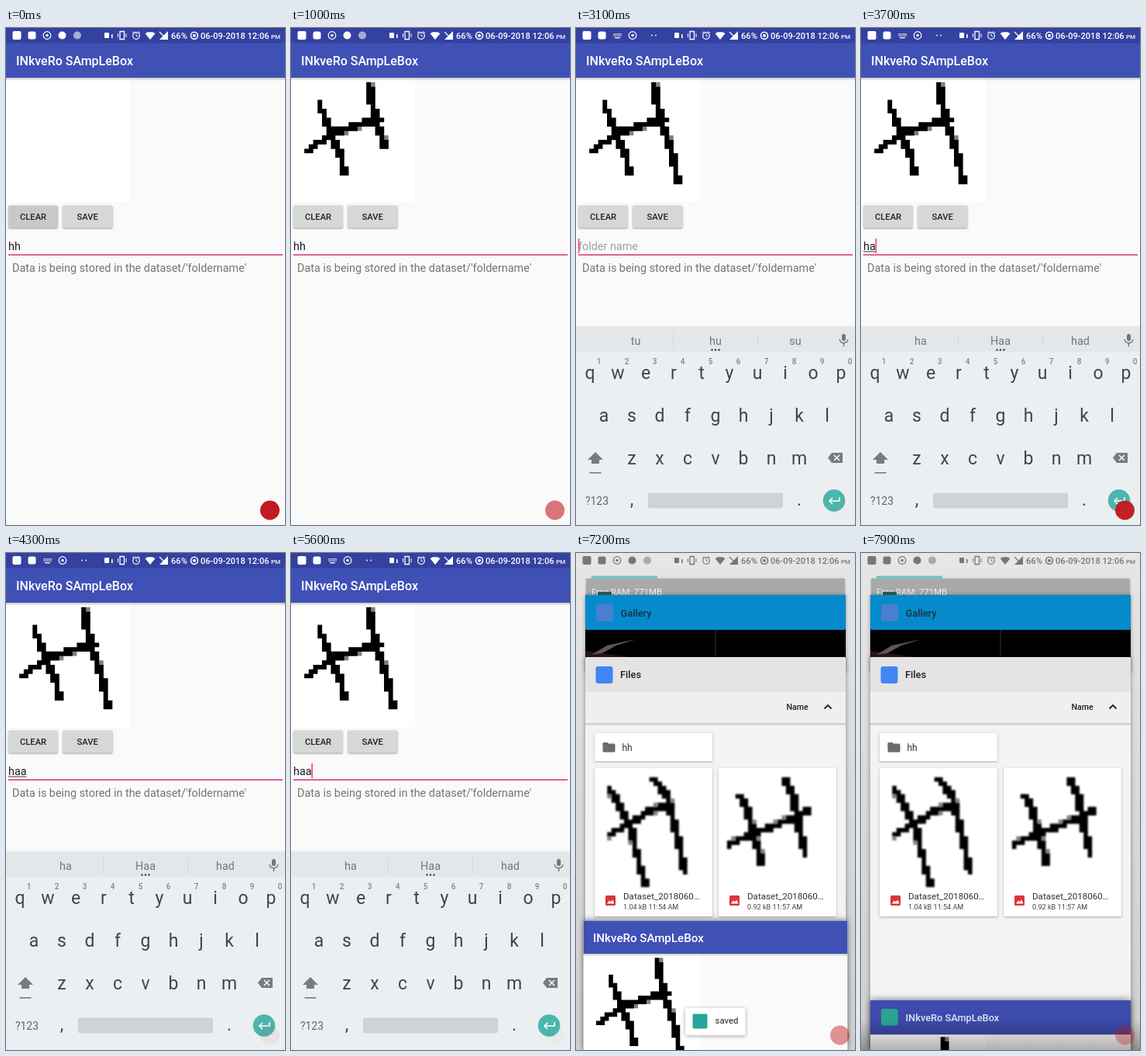
Animation, 360 px wide and 640 px high, one loop 8000 ms. Source, as an HTML page with a canvas:

```html
<!DOCTYPE html>
<html lang="en">
<head>
<meta charset="utf-8">
<style>
html, body { margin: 0; width: 100%; height: 100%; overflow: hidden; background: #fafafa; }
canvas { display: block; width: 360px; height: 640px; }
</style>
</head>
<body>
<canvas id="stage" width="360" height="640"></canvas>
<script>
const ctx = document.getElementById('stage').getContext('2d');
const LOOP = 8000, STEP = 100;
const APP_NAME = 'INkveRo SAmpLeBox';
const clamp = v => Math.max(0, Math.min(1, v));
const span = (t, from, to) => clamp((t - from) / (to - from));
const easeOut = u => 1 - (1 - u) ** 3;

// ---------- drawing helpers ----------
function rect(x, y, w, h, color, r = 0) {
  ctx.fillStyle = color;
  ctx.beginPath();
  ctx.roundRect(x, y, w, h, r);
  ctx.fill();
}
function disc(x, y, r, color) {
  ctx.fillStyle = color;
  ctx.beginPath();
  ctx.arc(x, y, r, 0, 7);
  ctx.fill();
}
function line(points, color, width = 1, close = false) {
  ctx.strokeStyle = color;
  ctx.lineWidth = width;
  ctx.beginPath();
  points.forEach(p => ctx.lineTo(...p));
  if (close) ctx.closePath();
  ctx.stroke();
}
function poly(points, color) {
  ctx.fillStyle = color;
  ctx.beginPath();
  points.forEach(p => ctx.lineTo(...p));
  ctx.fill();
}
function ring(x, y, r, color, width = 1.2) {
  ctx.strokeStyle = color;
  ctx.lineWidth = width;
  ctx.beginPath();
  ctx.arc(x, y, r, 0, 7);
  ctx.stroke();
}
function text(str, x, y, size, color, weight = 400, align = 'left') {
  ctx.font = `${weight} ${size}px Roboto, sans-serif`;
  ctx.fillStyle = color;
  ctx.textAlign = align;
  ctx.fillText(str, x, y);
}
function fade(x, y, w, h, from, to) {
  const g = ctx.createLinearGradient(0, y, 0, y + h);
  g.addColorStop(0, from);
  g.addColorStop(1, to);
  rect(x, y, w, h, g);
}
function shadowed(blur, dy, alpha, draw) {
  ctx.save();
  ctx.shadowColor = `rgba(0,0,0,${alpha})`;
  ctx.shadowBlur = blur;
  ctx.shadowOffsetY = dy;
  draw();
  ctx.restore();
}
function layer(alpha, dy, draw) {
  ctx.save();
  ctx.globalAlpha *= alpha;
  ctx.translate(0, dy);
  draw();
  ctx.restore();
}

// ---------- pixelated handwriting ----------
const GRID = 28;
const strokes = [
  { at: [200, 450], pts: [[36, 97], [45, 118], [53, 138], [62, 160], [69, 184]] },
  { at: [500, 750], pts: [[22, 157], [50, 138], [80, 127], [114, 117]] },
  { at: [800, 1120], pts: [[101, 74], [105, 100], [112, 124], [124, 164], [131, 196]] }
];
function partial(pts, share) {
  const lens = pts.slice(1).map((p, i) => Math.hypot(p[0] - pts[i][0], p[1] - pts[i][1]));
  let left = share * lens.reduce((a, b) => a + b);
  const out = [pts[0]];
  for (let i = 0; i < lens.length && left > 0; i++) {
    const k = Math.min(1, left / lens[i]);
    out.push([0, 1].map(j => pts[i][j] + (pts[i + 1][j] - pts[i][j]) * k));
    left -= lens[i];
  }
  return out;
}
function distance(x, y, a, b) {
  const dx = b[0] - a[0], dy = b[1] - a[1];
  const k = clamp(((x - a[0]) * dx + (y - a[1]) * dy) / (dx * dx + dy * dy || 1));
  return Math.hypot(x - a[0] - dx * k, y - a[1] - dy * k);
}
function pixelInk(lines, left, top, cell) {
  const solid = new Path2D(), edge = new Path2D();
  for (let row = 0; row < GRID; row++) for (let col = 0; col < GRID; col++) {
    const x = left + col * cell, y = top + row * cell;
    let d = 99;
    for (const pts of lines) for (let i = 1; i < pts.length; i++)
      d = Math.min(d, distance(x + cell / 2, y + cell / 2, pts[i - 1], pts[i]));
    const noise = Math.abs(Math.sin(row * 12.99 + col * 78.23) * 43758.5) % 1;
    if (d < 4.5) solid.rect(x, y, cell + 0.2, cell + 0.2);
    else if (d < 5.8 && noise > 0.75) edge.rect(x, y, cell, cell);
  }
  ctx.fillStyle = 'rgba(0,0,0,.5)';
  ctx.fill(edge);
  ctx.fillStyle = '#000';
  ctx.fill(solid);
}
function handwriting(t) {
  const drawn = strokes.filter(s => t > s.at[0]).map(s => partial(s.pts, span(t, ...s.at)));
  pixelInk(drawn, 0, 64, 160 / GRID);
}

// ---------- status bar ----------
function statusBar(t, light) {
  const c = light ? '#777' : '#fff';
  rect(0, 0, 360, light ? 19 : 19.5, light ? '#e6e6e6' : '#3441a0');
  rect(8.5, 4, 11, 11, c, 2);
  rect(28.5, 4.5, 10, 10, c, 2.5);
  const typing = t >= 2300 && t < 6600;
  const slide = t >= 6600 ? 1 - span(t, 6600, 6700) : 0;
  const ringX = typing ? 73 : 53;
  ring(ringX, 9.5, 4.8, c);
  disc(ringX, 9.5, 1.8, c);
  if (typing) {
    for (let i = 0; i < 10; i++) rect(48.5 + i % 5 * 2.2, 7 + (i / 5 | 0) * 2.4, 1.4, 1.4, c);
    rect(50, 12, 7, 1.3, c);
    [98, 103].forEach(x => disc(x, 9.5, 0.9, c));
  } else {
    disc(72.5 + slide * 8, 9.5, 5, c);
    disc(92 + slide * 13, 9.5, 5, light ? '#aaa' : '#a3acd2');
  }
  rect(127, 6, 6, 7, c, 1);
  rect(136, 8, 1.6, 5, c);
  line([[147, 4.5], [152.5, 4.5], [152.5, 14.5], [147, 14.5]], c, 1.3, true);
  [[144.5, 7, 12], [155, 7, 12]].forEach(([x, a, b]) => line([[x, a], [x, b]], c));
  ring(168, 10, 4.3, c);
  line([[168, 7.5], [168, 10], [170, 11]], c);
  line([[163, 6.5], [165.5, 4.5]], c);
  line([[170.5, 4.5], [173, 6.5]], c);
  poly([[179.5, 7], [183, 5.3], [189, 5.3], [192.5, 7], [186, 15]], c);
  poly([[198, 15], [209, 4], [209, 15]], c);
  line([[198, 5], [207, 14]], c, 1.2);
  text('66%', 213, 13.7, 11.2, c, 500);
  ring(243, 9.7, 4.5, c, 1.6);
  disc(243, 9.7, 2, c);
  text('06-09-2018 12:06', 251, 13.7, 11.1, c, 500);
  text('PM', 342, 13.7, 8, c, 500);
}

// ---------- app screen ----------
const entries = [[0, 'hh'], [2700, 'h'], [2900, ''], [3400, 'h'], [3600, 'ha'], [3800, 'haa']];
const cursorResets = [2300, 3000, 3400, 3600, 3800, 5600];
const lastBefore = (list, t, key = v => v) => list.filter(v => key(v) <= t).pop();

function button(label, x, w, pressed) {
  shadowed(2, 1, 0.35, () => rect(x, 228.6, w, 29, pressed ? '#c9c9c9' : '#d6d7d7', 2));
  text(label, x + w / 2, 247.2, 11.2, '#222', 500, 'center');
}
function appScreen(t) {
  rect(0, 19, 360, 621, '#fafafa');
  rect(0, 64, 160, 160, '#fff');
  handwriting(t);
  rect(0, 19, 360, 45, '#3f51b5');
  fade(0, 64, 360, 4, 'rgba(0,0,0,.22)', 'rgba(0,0,0,0)');
  text(APP_NAME, 13, 48, 16, '#fff', 500);
  button('CLEAR', 3, 64, t < 300);
  button('SAVE', 73, 64.5, t >= 5700 && t < 6100);

  const value = lastBefore(entries, t, e => e[0])[1];
  text(value || 'folder name', 3, 286, 14.4, value ? '#222' : '#a0a0a0');
  const width = value ? ctx.measureText(value).width : 0;
  if (t >= 3400 && t < 5600) rect(3, 287.5, width, 1, '#333');
  const reset = lastBefore(cursorResets, t);
  if (reset && Math.floor((t - reset) / 500) % 2 === 0) rect(2.8 + width, 271, 1.6, 19, '#ec407a');
  rect(3, 291.3, 354, 1.7, '#de4c8a');
  text("Data is being stored in the dataset/'foldername'", 8, 313.7, 14.4, '#747474');
}

// ---------- keyboard ----------
function keyboard(t) {
  const ink = '#3b474e', soft = '#70787d';
  fade(0, 382, 360, 4, 'rgba(0,0,0,0)', 'rgba(0,0,0,.08)');
  rect(0, 385, 360, 290, '#eceff1');
  rect(0, 385, 360, 32, '#e4e7e9');
  const words = t < 3400 ? ['tu', 'hu', 'su'] : t < 3600 ? ['he', 'have', 'had'] : ['ha', 'Haa', 'had'];
  words.forEach((w, i) => text(w, 77 + i * 103, 407.5, 14.4, soft, 400, 'center'));
  [125, 234].forEach(x => rect(x, 392, 1, 20, '#d3d7d9'));
  [175.5, 180, 184.5].forEach(x => disc(x, 414.5, 1.3, '#444'));
  rect(343, 394, 5, 9, soft, 2.5);
  line([[340, 401], [341.5, 404.5], [345.5, 406], [349.5, 404.5], [351, 401]], soft, 1.4);
  line([[345.5, 406], [345.5, 410]], soft, 1.5);

  [['qwertyuiop', 18, 452], ['asdfghjkl', 36, 507], ['zxcvbnm', 72, 562]].forEach(([keys, x, y]) =>
    [...keys].forEach((k, i) => text(k, x + i * 36, y, 23, ink, 400, 'center')));
  [...'1234567890'].forEach((n, i) => text(n, 29.5 + i * 36, 432.5, 10, '#7d868b', 500, 'center'));

  poly([[25, 546], [35, 556], [30, 556], [30, 561], [20, 561], [20, 556], [15, 556]], '#737d82');
  rect(17.5, 572, 15, 1.6, '#737d82');
  poly([[325, 553.5], [330, 547], [344, 547], [344, 560], [330, 560]], '#737d82');
  line([[333, 550], [340, 557]], '#fff', 1.5);
  line([[340, 550], [333, 557]], '#fff', 1.5);

  text('?123', 27, 613.5, 14, '#5c676d', 400, 'center');
  text(',', 72, 615, 23, ink, 400, 'center');
  text('.', 288, 615, 23, ink, 400, 'center');
  rect(93, 598.5, 174, 20, '#cfd3d6', 3);
  disc(333, 608.5, 14.3, '#4db6ac');
  line([[340, 604], [340, 609], [327, 609]], '#fff', 1.6);
  line([[331, 605], [327, 609], [331, 613]], '#fff', 1.6);
}

// ---------- overview of recent screens ----------
function thumbnail(x, marks, info) {
  shadowed(3, 1, 0.3, () => rect(x, 277, 152, 191, '#fff', 1));
  ctx.save();
  ctx.filter = 'blur(1.3px)';
  pixelInk(marks, x, 278, 152 / GRID);
  ctx.restore();
  rect(x + 14, 441, 13, 13, '#d9363a', 1.5);
  poly([[x + 16, 451.5], [x + 19, 447.5], [x + 21, 449.5], [x + 23, 446.5], [x + 25.5, 451.5]], '#fff');
  text('Dataset_2018060…', x + 37, 446.3, 11.6, '#303030');
  text(info, x + 37, 459.3, 9.1, '#444');
}
function recents() {
  fade(0, 0, 360, 640, '#e6e6e6', '#cfcfcf');
  rect(20, 29.5, 85, 3, '#67c9c4');
  shadowed(3, 0, 0.25, () => rect(13, 33, 334, 60, '#a9a9a9', 2));
  text('Free RAM: 771MB', 20, 54, 11.4, '#f2f2f2');
  rect(28, 50, 18, 4, '#355a48');

  shadowed(5, 0, 0.35, () => rect(12, 54, 336, 100, '#000', 2));
  rect(12, 54, 336, 45, '#058bcb', 2);
  rect(26, 66, 22, 22, '#4a7fd0', 3);
  text('Gallery', 57.5, 81.5, 12.8, '#17313f', 500);
  poly([[12, 126], [40, 130], [70, 134], [12, 134]], '#2b1714');
  poly([[20, 131], [40, 119], [78, 111], [52, 119], [34, 129]], '#5d5856');
  rect(179.5, 99, 1, 35, '#333');

  shadowed(6, 0, 0.4, () => rect(12, 134, 336, 530, '#f3f3f3', 2));
  rect(12, 134, 336, 45, '#e4e4e4', 2);
  rect(25.5, 146, 22, 22, '#4285f4', 3);
  text('Files', 57, 161.3, 12.8, '#222', 500);
  rect(12, 179, 336, 40, '#efefef');
  fade(12, 219, 336, 4, 'rgba(0,0,0,.2)', 'rgba(0,0,0,0)');
  text('Name', 271.5, 202, 10.6, '#222', 500);
  line([[320.5, 200.5], [325, 196], [329.5, 200.5]], '#222', 1.8);

  shadowed(3, 1, 0.3, () => rect(24, 232, 152, 36, '#fff', 1));
  rect(34.5, 244, 7, 4, '#6b6b6b', 1);
  rect(34.5, 245.5, 16, 11, '#6b6b6b', 1.5);
  text('hh', 59.5, 254.5, 12, '#333');
  thumbnail(24, [
    [[44, 306], [58, 328], [70, 352], [81, 398], [89, 424]],
    [[43, 363], [70, 348], [94, 333], [122, 324]],
    [[100, 290], [117, 312], [124, 340], [134, 380], [139, 408]]
  ], '1.04 kB 11:54 AM');
  thumbnail(184, [
    [[211, 312], [222, 332], [229, 364], [240, 400]],
    [[199, 375], [226, 362], [262, 349], [300, 331]],
    [[271, 295], [281, 315], [286, 350], [296, 387]]
  ], '0.92 kB 11:57 AM');
}
function appCard(t, p) {
  const top = 19 + 557 * p, scale = 1 - p / 15, x = 12 * p;
  shadowed(9 * p, -1, 0.5, () => rect(x, top, 360 - 2 * x, 640 - top, '#fafafa', 2));
  ctx.save();
  ctx.translate(x, top);
  ctx.scale(scale, scale);
  ctx.translate(0, -19);
  appScreen(t);
  ctx.restore();
  layer(span(t, 7250, 7500), 0, () => {
    fade(12, top, 336, 44, '#3e4db0', '#3a48a6');
    rect(26, top + 11, 21.5, 21.5, '#2ba58f', 3);
    text(APP_NAME, 57.5, top + 27, 12.8, '#dfe2f3', 500);
    fade(0, 600, 360, 40, 'rgba(0,0,0,0)', 'rgba(0,0,0,.3)');
  });
}

function toast() {
  shadowed(5, 1, 0.35, () => rect(141, 586, 77.5, 35, '#fff', 3));
  rect(150.5, 593.5, 19, 19, '#26a69a', 2);
  text('saved', 179.5, 606, 11.4, '#222');
}

// ---------- timeline ----------
function render(t) {
  ctx.clearRect(0, 0, 360, 640);
  if (t >= 6950) {
    recents();
    statusBar(t, true);
    appCard(t, easeOut(span(t, 6950, 7530)));
  } else {
    appScreen(t);
    statusBar(t, false);
  }
  const shown = easeOut(span(t, 2100, 2500)) * (1 - span(t, 6500, 6680));
  if (shown > 0) layer(shown, (1 - shown) * 48, () => keyboard(t));
  const notice = span(t, 6000, 6200) * (1 - span(t, 7450, 7750));
  if (notice > 0) layer(notice, 0, toast);
  const pulse = 0.5 + 0.5 * Math.cos((t - 25) / 1250 * 2 * Math.PI);
  layer(pulse, 0, () => disc(340.5, 621, 12.5, '#c01a1f'));
}

const start = performance.now();
let shownTime = -1;
function tick() {
  const t = Math.floor((performance.now() - start) % LOOP / STEP) * STEP;
  if (t !== shownTime) render(shownTime = t);
  requestAnimationFrame(tick);
}
tick();
</script>
</body>
</html>
```
